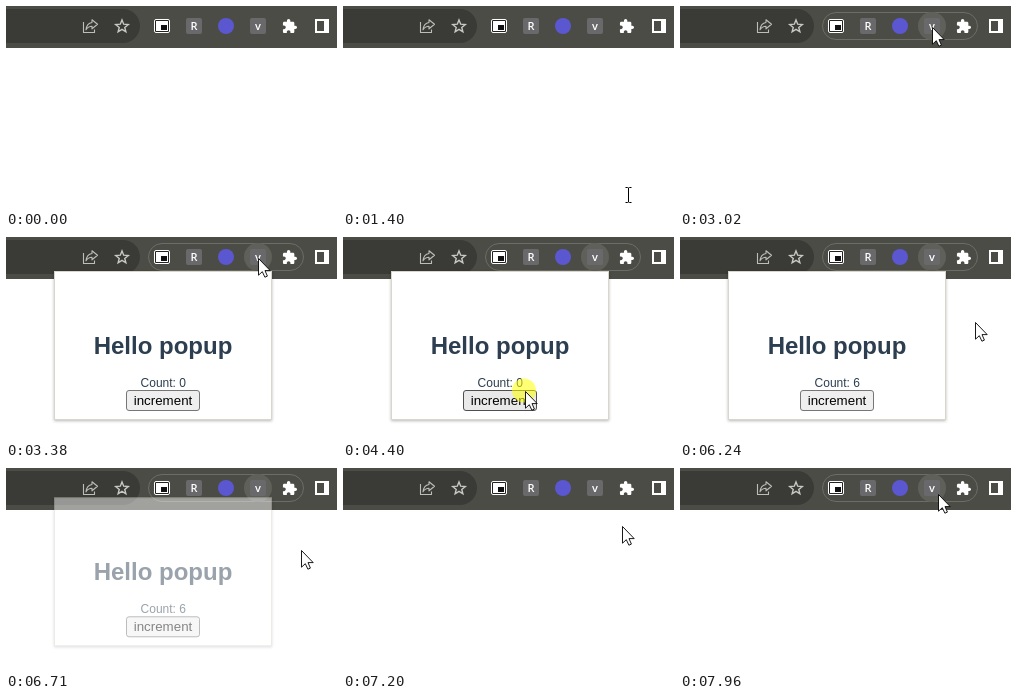
An HTML page that plays this animation: 331 by 203 pixels, repeating every 8000 ms.

```html
<!DOCTYPE html>
<html lang="en">
<head>
<meta charset="utf-8">
<title>Popup counter</title>
<style>
  html, body { margin: 0; width: 100%; height: 100%; overflow: hidden; background: #fff; }
  svg { display: block; width: 331px; height: 203px; }
  text { text-anchor: middle; }
  .chip { font: 600 11px "Open Sans", "Noto Sans", sans-serif; fill: #fff; }
  .popup text { font-family: "Liberation Sans", Arial, sans-serif; fill: #2c3e50; }
  .popup .title { font-size: 24px; font-weight: bold; }
  .popup .count { font-size: 12px; }
  .popup .label { font-size: 13.333px; fill: #000; }
  .panel { filter: drop-shadow(0 1px 1.5px rgba(0, 0, 0, .28)); }
</style>
</head>
<body>
<svg viewBox="0 0 331 203">
  <rect width="331" height="203" fill="#fff"/>
  <rect width="331" height="42" fill="#4c4c46"/>
  <rect x="-40" y="3" width="174" height="34" rx="17" fill="#3a3a37"/>

  <g fill="none" stroke="#bdbdb9" stroke-width="1.1" stroke-linejoin="round">
    <path d="M77.5 16V26.5H88.5V23.5"/>
    <path d="M86 13.8 91.5 18.3 86 22.8V20.3C83.5 20.3 81.5 21.5 80 23.8 80.5 19.5 82.5 17 86 16.5Z"/>
    <polygon id="star" stroke="#c8c8c4" stroke-width="1.4" stroke-linejoin="miter"/>
  </g>

  <rect id="pill" x="142.5" y="6.5" width="155" height="27" rx="13.5" fill="none" stroke="#6d6d67"/>
  <circle id="hover" cx="252" cy="20" r="14" fill="#60605b"/>

  <rect x="148.5" y="13.5" width="15" height="13" rx="1.5" fill="#222" stroke="#fff"/>
  <rect x="150" y="15" width="12" height="10" fill="#fff"/>
  <rect x="155" y="19" width="6" height="5" fill="#111"/>

  <rect x="180" y="12" width="16" height="16" rx="2" fill="#69696b"/>
  <text class="chip" x="188" y="24">R</text>
  <circle cx="220" cy="20" r="8" fill="#5a57d0"/>
  <rect x="244" y="12" width="16" height="16" rx="2" fill="#69696b"/>
  <text class="chip" x="252" y="24">v</text>

  <path transform="translate(275.6 12.3) scale(.67)" fill="#fff" d="M20.5 11H19V7c0-1.1-.9-2-2-2h-4V3.5C13 2.1 11.9 1 10.5 1S8 2.1 8 3.5V5H4c-1.1 0-2 .9-2 2v3.8h1.5c1.5 0 2.7 1.2 2.7 2.7s-1.2 2.7-2.7 2.7H2V20c0 1.1.9 2 2 2h3.8v-1.5c0-1.5 1.2-2.7 2.7-2.7s2.7 1.2 2.7 2.7V22H17c1.1 0 2-.9 2-2v-4h1.5c1.4 0 2.5-1.1 2.5-2.5S21.9 11 20.5 11z"/>
  <path fill="#fff" fill-rule="evenodd" d="M309 13H323V27H309ZM311 15V25H318V15Z"/>

  <g id="popup" class="popup">
    <rect class="panel" x="48.5" y="34.5" width="217" height="148" fill="#fff" stroke="#d9d6cb"/>
    <text class="title" x="157" y="117">Hello popup</text>
    <text class="count" x="157.3" y="150">Count: <tspan id="count">0</tspan></text>
    <rect id="button" x="120.5" y="153.5" width="73" height="20" rx="2.5"/>
    <text class="label" x="157" y="168">increment</text>
  </g>

  <circle id="click" r="12" fill="#ff0" fill-opacity=".55"/>
  <path id="arrow" d="M.5 .5V17.2L4.3 13.7 6.9 19.2 9.4 18.1 7 12.6H12.2Z" fill="#fff" stroke="#000" stroke-width=".9" stroke-linejoin="round"/>
  <path id="beam" d="M-3-7.5H-1L0-7 1-7.5H3M0-7V7M-3 7.5H-1L0 7 1 7.5H3" fill="none" stroke="#000"/>
</svg>
<script>
const LOOP = 8000, STEP = 70, CLOSE = 6580;
const ids = ["star", "pill", "hover", "popup", "count", "button", "click", "arrow", "beam"];
const parts = Object.fromEntries(ids.map(id => [id, document.getElementById(id)]));

const moves = [
  { start: 1400, end: 2090, to: [252, 21] },
  { start: 3510, end: 4140, to: [182, 154] },
  { start: 5490, end: 5970, to: [297, 102] },
  { start: 6030, end: 6310, to: [295, 82] },
  { start: 6840, end: 7620, to: [258, 26] }
];

const press = (down, length) => ({ down, up: down + length });
const counted = Array.from({ length: 6 }, (_, i) => press(4400 + i * 178, i < 5 ? 85 : 130));
const presses = [press(2760, 260), ...counted, press(6440, 140), press(7890, 70)];

const clamp = v => Math.min(1, Math.max(0, v));
const ease = p => p * p * (3 - 2 * p);
const ramp = (t, start, length) => clamp((t - start) / length);

function cursorAt(t) {
  let [x, y] = [285, 189];
  for (const { start, end, to } of moves) {
    const held = Math.floor((t - start) / STEP) * STEP;
    const p = t >= end ? 1 : ease(ramp(held, 0, end - start));
    x += (to[0] - x) * p;
    y += (to[1] - y) * p;
  }
  return [Math.round(x), Math.round(y)];
}

// Toolbar highlight: on from first entry, off after the popup closes, on again
const highlight = (t, delay) =>
  ramp(t, 1800 + delay, 120) - ramp(t, 6900, 100) + ramp(t, 7380 + delay, 120);

const show = (el, alpha) => { el.style.opacity = +alpha; };
const shift = (el, x, y) => el.setAttribute("transform", `translate(${x} ${y})`);

function draw(t) {
  const [x, y] = cursorAt(t);
  const present = t >= 1400;
  const beam = t < 2090 && y > 140;
  const alpha = ramp(t, 3170, 210) - ramp(t, CLOSE, 250);
  const over = x >= 120 && x <= 194 && y >= 153 && y <= 174;

  show(parts.pill, highlight(t, 0));
  show(parts.hover, highlight(t, 70));
  show(parts.popup, alpha);
  shift(parts.popup, 0, t >= CLOSE ? -9 * (1 - alpha) : 0);
  parts.count.textContent = counted.filter(({ up }) => t >= up).length;
  parts.button.setAttribute("fill", over ? "#e9e9e9" : "#efefef");
  parts.button.setAttribute("stroke", over ? "#4f4f4f" : "#767676");

  shift(parts.arrow, x, y);
  shift(parts.beam, x + .5, y);
  shift(parts.click, x - 1, y - .5);
  show(parts.arrow, present && !beam);
  show(parts.beam, present && beam);
  show(parts.click, presses.some(({ down, up }) => t >= down && t < up));
}

parts.star.setAttribute("points", Array.from({ length: 10 }, (_, i) => {
  const r = i % 2 ? 2.9 : 6.6, a = i * Math.PI / 5;
  return [116 + r * Math.sin(a), 20.5 - r * Math.cos(a)].map(v => v.toFixed(2)).join();
}).join(" "));

const begin = performance.now();
function tick() {
  draw((performance.now() - begin) % LOOP);
  requestAnimationFrame(tick);
}
tick();
</script>
</body>
</html>
```
